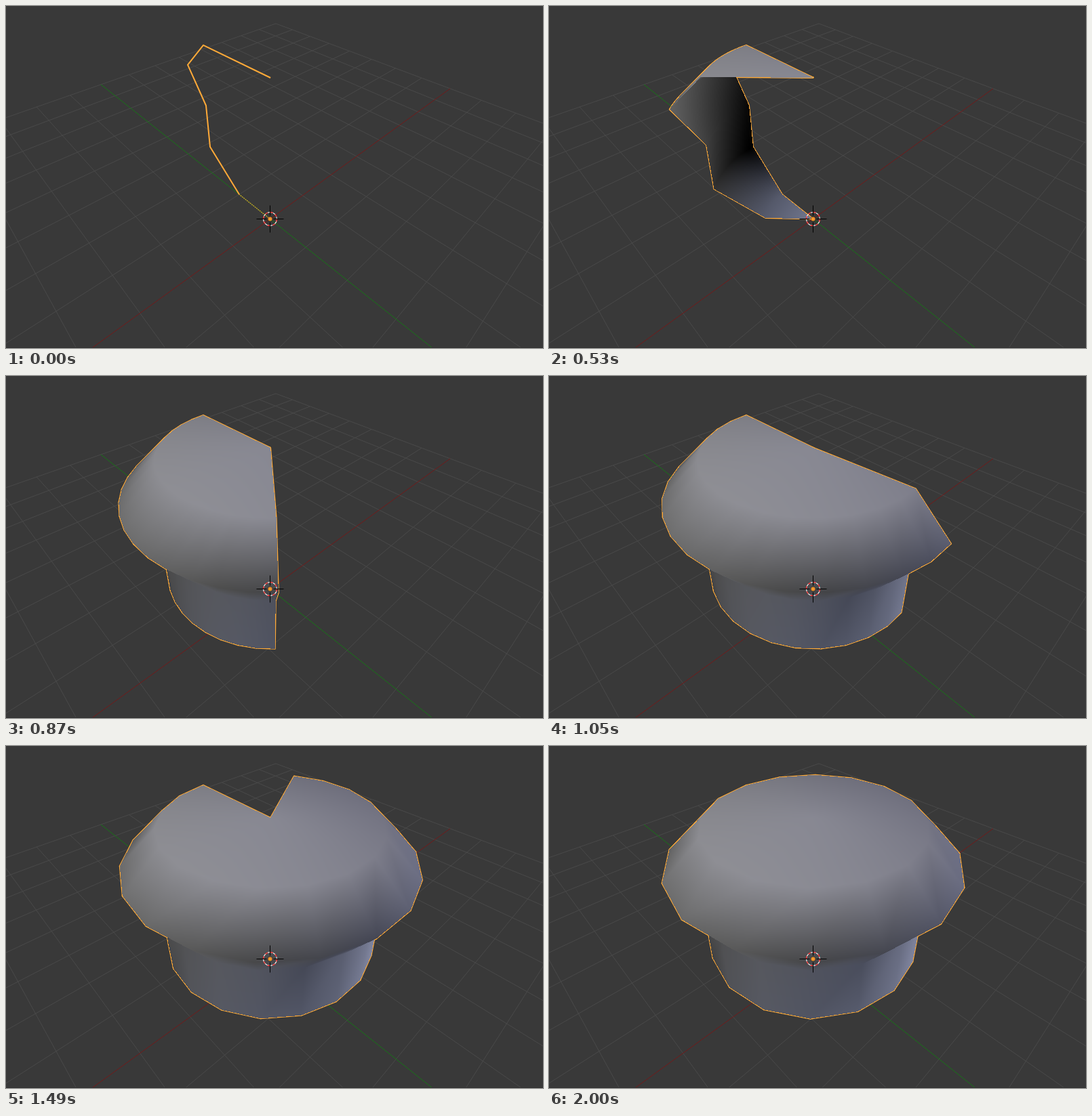
An HTML page with a canvas for the animation above (2900 ms loop, 792 by 505 pixels).

```html
<!DOCTYPE html>
<html>
<head>
<meta charset="utf-8">
<style>
html, body { margin: 0; width: 100%; height: 100%; overflow: hidden; background: #393939; }
canvas { display: block; }
</style>
</head>
<body>
<canvas id="view" width="792" height="505"></canvas>
<script>
const W = 792, H = 505, STEPS = 16, LOOP = 2900;
const ctx = document.getElementById('view').getContext('2d');
const layer = document.createElement('canvas');
layer.width = W;
layer.height = H;
const layerCtx = layer.getContext('2d');

// Profile of the lathe: radius, height, outward normal
const profile = [[0, 0], [.1247, 0], [.2413, .1026], [.2337, .2376],
                 [.291, .3262], [.2121, .3985], [0, .3998]];
const unit = v => { const n = Math.hypot(...v); return v.map(c => c / n); };
const dot = (a, b) => a[0] * b[0] + a[1] * b[1] + a[2] * b[2];
const segNormals = profile.slice(1).map(([r, z], i) =>
  unit([z - profile[i][1], profile[i][0] - r]));
const normals = profile.map((p, i) => {
  if (i === 0) return [0, -1];
  if (i === profile.length - 1) return [0, 1];
  const a = segNormals[i - 1], b = segNormals[i];
  return unit([a[0] + b[0], a[1] + b[1]]);
});

// Perspective from world (red axis, green axis, up) to the screen
function project(u, v, z = 0) {
  const w = 1 + .538 * u + .565 * v - .711 * z;
  return [(389.5 + 617.9 * u - 170.4 * v - 275.9 * z) / w,
          (314.5 - 126.9 * u - 133 * v - 596.9 * z) / w, 1 / w];
}

const lights = [
  [[-.892, .3, .9], [.8, .8, .8]],
  [[.588, .46, .248], [.498, .5, .6]],
  [[.216, -.392, -.216], [.798, .838, 1]]
].map(([dir, col]) => [unit(dir), col]);

function shade(u, v, z) {
  const n = unit([.724 * u - .69 * v, .465 * u + .488 * v + .739 * z,
                  -.51 * u - .535 * v + .674 * z]);
  return [0, 1, 2].map(c => 255 * .64 *
    lights.reduce((sum, [dir, col]) => sum + Math.max(0, dot(n, dir)) * col[c], 0));
}

function buildRings(angle) {
  return Array.from({ length: STEPS + 1 }, (_, k) => {
    const s = -Math.sin(angle * k / STEPS), c = Math.cos(angle * k / STEPS);
    return profile.map(([r, z], i) => {
      const [nr, nz] = normals[i];
      return [...project(r * s, r * c, z), ...shade(nr * s, nr * c, nz)];
    });
  });
}

// Smooth-shaded triangle with a depth test on 1/w
function fillTriangle(a, b, c, img, depth) {
  const area = (b[0] - a[0]) * (c[1] - a[1]) - (b[1] - a[1]) * (c[0] - a[0]);
  if (Math.abs(area) < .01) return;
  const xs = [a[0], b[0], c[0]], ys = [a[1], b[1], c[1]];
  const x0 = Math.floor(Math.min(...xs)), x1 = Math.ceil(Math.max(...xs));
  const y0 = Math.floor(Math.min(...ys)), y1 = Math.ceil(Math.max(...ys));
  for (let y = y0; y <= y1; y++) for (let x = x0; x <= x1; x++) {
    const px = x + .5, py = y + .5;
    const p = ((b[0] - px) * (c[1] - py) - (b[1] - py) * (c[0] - px)) / area;
    const q = ((c[0] - px) * (a[1] - py) - (c[1] - py) * (a[0] - px)) / area;
    const r = 1 - p - q;
    if (p < 0 || q < 0 || r < 0) continue;
    const at = y * W + x, near = p * a[2] + q * b[2] + r * c[2];
    if (near <= depth[at]) continue;
    depth[at] = near;
    for (let k = 0; k < 3; k++)
      img.data[at * 4 + k] = p * a[k + 3] + q * b[k + 3] + r * c[k + 3];
    img.data[at * 4 + 3] = 255;
  }
}

function line(points, color, width = 1) {
  ctx.strokeStyle = color;
  ctx.lineWidth = width;
  ctx.beginPath();
  points.forEach(([x, y]) => ctx.lineTo(x, y));
  ctx.stroke();
}

function drawFloor() {
  ctx.fillStyle = '#393939';
  ctx.fillRect(0, 0, W, H);
  // Lines end before they pass behind the camera
  const alongV = u => [project(u, 1), project(u, Math.max(-1, (-.85 - .538 * u) / .565))];
  const alongU = v => [project(1, v), project(Math.max(-1, (-.85 - .565 * v) / .538), v)];
  for (let i = -8; i <= 8; i++) if (i) {
    line(alongV(i / 8), '#494949');
    line(alongU(i / 8), '#494949');
  }
  line(alongU(0), '#721a1a');
  line(alongV(0), '#177417');
  ctx.fillStyle = '#303030';
  ctx.fillRect(0, H - 1, W, 1);
}

function drawSolid(angle) {
  const rings = buildRings(angle), orange = '#ffaa38';
  ctx.lineJoin = 'round';
  if (angle === 0) {
    line(rings[0].slice(1), orange, 2);
    ctx.setLineDash([2, 1]);
    line(rings[0].slice(0, 2), '#d09a30', 1.3);
    ctx.setLineDash([]);
    return;
  }
  // The surface covers the inner half of every edge, leaving the outline
  rings.forEach(ring => line(ring, orange, 2));
  profile.forEach((_, i) => line(rings.map(ring => ring[i]), orange, 2));

  const img = layerCtx.createImageData(W, H), depth = new Float32Array(W * H);
  for (let k = 0; k < STEPS; k++) for (let i = 0; i + 1 < profile.length; i++) {
    const a = rings[k][i], b = rings[k + 1][i], c = rings[k + 1][i + 1], d = rings[k][i + 1];
    fillTriangle(a, b, c, img, depth);
    fillTriangle(a, c, d, img, depth);
  }
  layerCtx.putImageData(img, 0, 0);
  ctx.drawImage(layer, 0, 0);
}

function circle(r, color, width) {
  ctx.beginPath();
  ctx.arc(389.5, 314.5, r, 0, 2 * Math.PI);
  ctx.strokeStyle = color;
  ctx.lineWidth = width;
  ctx.stroke();
}

function drawCursor() {
  const x = 389.5, y = 314.5;
  circle(10, '#fff', 1.1);
  ctx.setLineDash([3.927, 3.927]);
  circle(10, '#f00', 1.1);
  ctx.setLineDash([]);
  for (const s of [-1, 1]) {
    line([[x + 5 * s, y], [x + 20 * s, y]], '#000');
    line([[x, y + 5 * s], [x, y + 20 * s]], '#000');
  }
  circle(3, '#201408', 1);
  ctx.fillStyle = '#f2962f';
  ctx.fill();
}

// Start time of each pose: 90 ms apart, a few 80 ms
const starts = [0];
for (let i = 0; i < 23; i++)
  starts.push(starts[i] + ([0, 6, 9, 16, 18, 21, 22].includes(i) ? 80 : 90));

const pace = [[0, 0], [4, .1496], [8, .324], [10, .429], [14, .593], [19, .819], [23, 1]];

function turn(pose) {
  const j = Math.max(1, pace.findIndex(([i]) => i >= pose));
  const [i0, x0] = pace[j - 1], [i1, x1] = pace[j];
  const x = x0 + (x1 - x0) * (pose - i0) / (i1 - i0);
  // Bezier ease with handles at .39 and .61, solved by bisection
  let lo = 0, hi = 1;
  for (let n = 0; n < 30; n++) {
    const s = (lo + hi) / 2, r = 1 - s;
    if (1.1712 * s * r * r + 1.8288 * s * s * r + s * s * s < x) lo = s; else hi = s;
  }
  return pose ? 2 * Math.PI * hi * hi * (3 - 2 * hi) : 0;
}

let shown = -1;
const begin = performance.now();

function tick() {
  const t = (performance.now() - begin) % LOOP;
  const pose = starts.filter(s => s <= t).length - 1;
  if (pose !== shown) {
    shown = pose;
    drawFloor();
    drawSolid(turn(pose));
    drawCursor();
  }
  requestAnimationFrame(tick);
}
tick();
</script>
</body>
</html>
```
